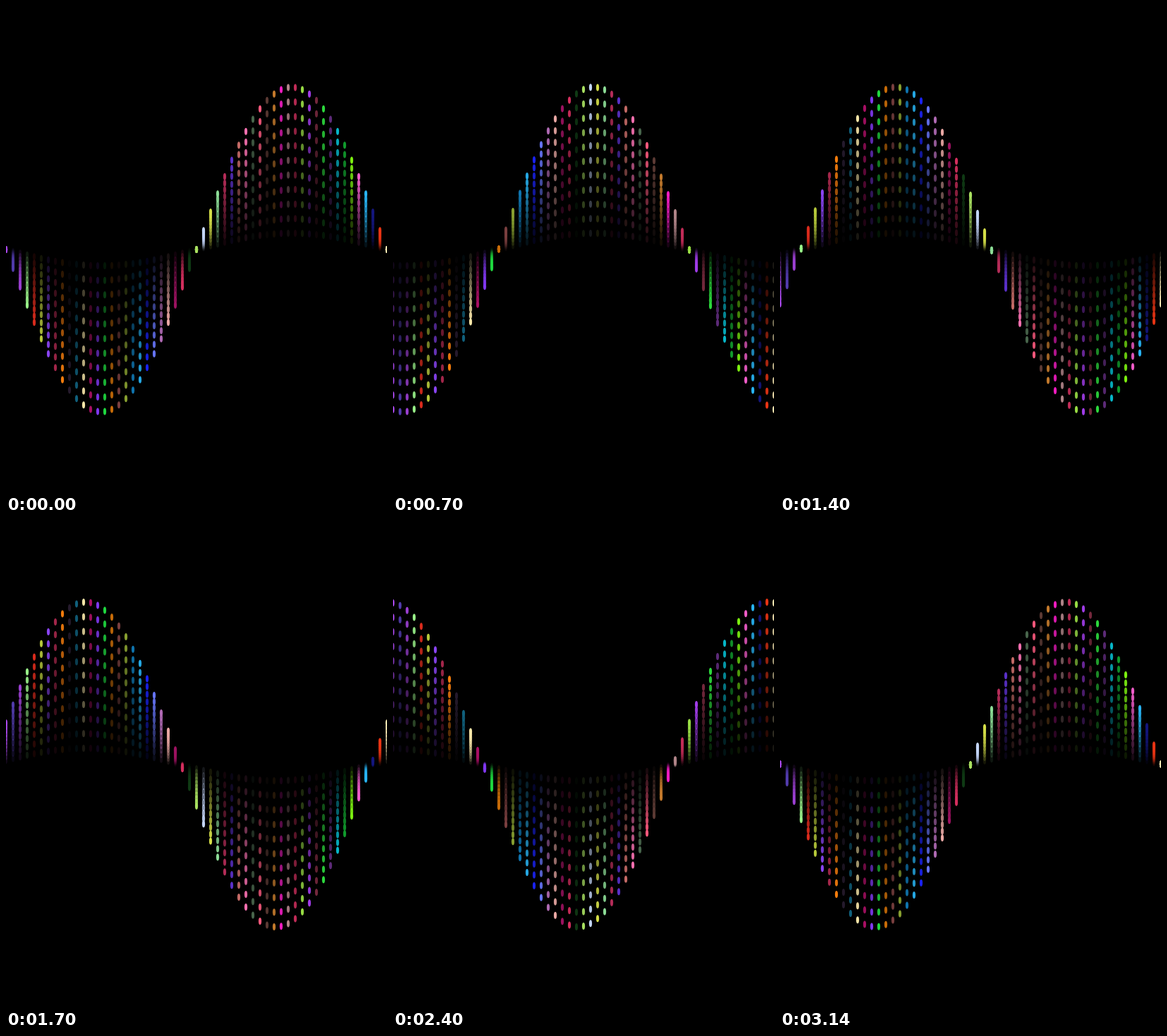
These frames come from a looping animation (540x690 px, 3160 ms). An HTML page without scripts:

```html
<!DOCTYPE html>
<html lang="en">
<head>
<meta charset="utf-8">
<title>Sine wave of dots</title>
<style>
@property --t {
  syntax: "<number>";
  inherits: true;
  initial-value: 0;
}
html, body {
  margin: 0;
  width: 100%;
  height: 100%;
  overflow: hidden;
  background: #000;
}
svg {
  display: block;
  width: 540px;
  height: 690px;
  animation: wave 3160ms steps(158) -3ms infinite;
}
/* phase in radians, 2 per second */
@keyframes wave {
  from { --t: 0; }
  to { --t: 6.32; }
}
use {
  --y: calc(230px * sin(var(--t) * 1rad + var(--i) * 1turn / 54));
  transform: translate(calc(var(--i) * 10px), 345px);
}
/* each dot of the trail is 9% nearer the axis and 9% fainter */
ellipse {
  --f: calc(1 - .09 * var(--k));
  fill: currentColor;
  opacity: var(--f);
  transform: translateY(calc(var(--y) * var(--f)));
}
</style>
</head>
<body>
<svg viewBox="0 0 540 690">
  <defs>
    <g id="col">
      <ellipse rx="2.1" ry="5" style="--k:10"/>
      <ellipse rx="2.1" ry="5" style="--k:9"/>
      <ellipse rx="2.1" ry="5" style="--k:8"/>
      <ellipse rx="2.1" ry="5" style="--k:7"/>
      <ellipse rx="2.1" ry="5" style="--k:6"/>
      <ellipse rx="2.1" ry="5" style="--k:5"/>
      <ellipse rx="2.1" ry="5" style="--k:4"/>
      <ellipse rx="2.1" ry="5" style="--k:3"/>
      <ellipse rx="2.1" ry="5" style="--k:2"/>
      <ellipse rx="2.1" ry="5" style="--k:1"/>
      <ellipse rx="2.1" ry="5" style="--k:0"/>
    </g>
  </defs>
  <use href="#col" style="--i:0;color:#a848ea"/>
  <use href="#col" style="--i:1;color:#513bab"/>
  <use href="#col" style="--i:2;color:#9a3fd0"/>
  <use href="#col" style="--i:3;color:#98f088"/>
  <use href="#col" style="--i:4;color:#d92b1c"/>
  <use href="#col" style="--i:5;color:#b5c83a"/>
  <use href="#col" style="--i:6;color:#8a44f5"/>
  <use href="#col" style="--i:7;color:#a3264a"/>
  <use href="#col" style="--i:8;color:#f57c0c"/>
  <use href="#col" style="--i:9;color:#251a2c"/>
  <use href="#col" style="--i:10;color:#10607c"/>
  <use href="#col" style="--i:11;color:#f8e6a8"/>
  <use href="#col" style="--i:12;color:#a80f64"/>
  <use href="#col" style="--i:13;color:#8038f0"/>
  <use href="#col" style="--i:14;color:#1fd83f"/>
  <use href="#col" style="--i:15;color:#c86c08"/>
  <use href="#col" style="--i:16;color:#7a3f3f"/>
  <use href="#col" style="--i:17;color:#88a030"/>
  <use href="#col" style="--i:18;color:#0f74ae"/>
  <use href="#col" style="--i:19;color:#25a8e4"/>
  <use href="#col" style="--i:20;color:#1a22f0"/>
  <use href="#col" style="--i:21;color:#6674f8"/>
  <use href="#col" style="--i:22;color:#b06ab4"/>
  <use href="#col" style="--i:23;color:#eaa8a4"/>
  <use href="#col" style="--i:24;color:#9c1260"/>
  <use href="#col" style="--i:25;color:#d42f5e"/>
  <use href="#col" style="--i:26;color:#0f3a14"/>
  <use href="#col" style="--i:27;color:#a8e060"/>
  <use href="#col" style="--i:28;color:#c4d6fa"/>
  <use href="#col" style="--i:29;color:#d4de48"/>
  <use href="#col" style="--i:30;color:#8cdc96"/>
  <use href="#col" style="--i:31;color:#b42c58"/>
  <use href="#col" style="--i:32;color:#5a30c8"/>
  <use href="#col" style="--i:33;color:#c46a66"/>
  <use href="#col" style="--i:34;color:#f870b0"/>
  <use href="#col" style="--i:35;color:#48664c"/>
  <use href="#col" style="--i:36;color:#f8587c"/>
  <use href="#col" style="--i:37;color:#5c3a34"/>
  <use href="#col" style="--i:38;color:#c47a2c"/>
  <use href="#col" style="--i:39;color:#f01cc0"/>
  <use href="#col" style="--i:40;color:#b08488"/>
  <use href="#col" style="--i:41;color:#c22c58"/>
  <use href="#col" style="--i:42;color:#98dc44"/>
  <use href="#col" style="--i:43;color:#a03ce8"/>
  <use href="#col" style="--i:44;color:#74283c"/>
  <use href="#col" style="--i:45;color:#2cd83c"/>
  <use href="#col" style="--i:46;color:#5c2a78"/>
  <use href="#col" style="--i:47;color:#06b6c8"/>
  <use href="#col" style="--i:48;color:#109a2c"/>
  <use href="#col" style="--i:49;color:#7cf010"/>
  <use href="#col" style="--i:50;color:#f05cc8"/>
  <use href="#col" style="--i:51;color:#28b4f4"/>
  <use href="#col" style="--i:52;color:#14167c"/>
  <use href="#col" style="--i:53;color:#e83414"/>
  <use href="#col" style="--i:54;color:#f4e4b0"/>
</svg>
</body>
</html>
```
